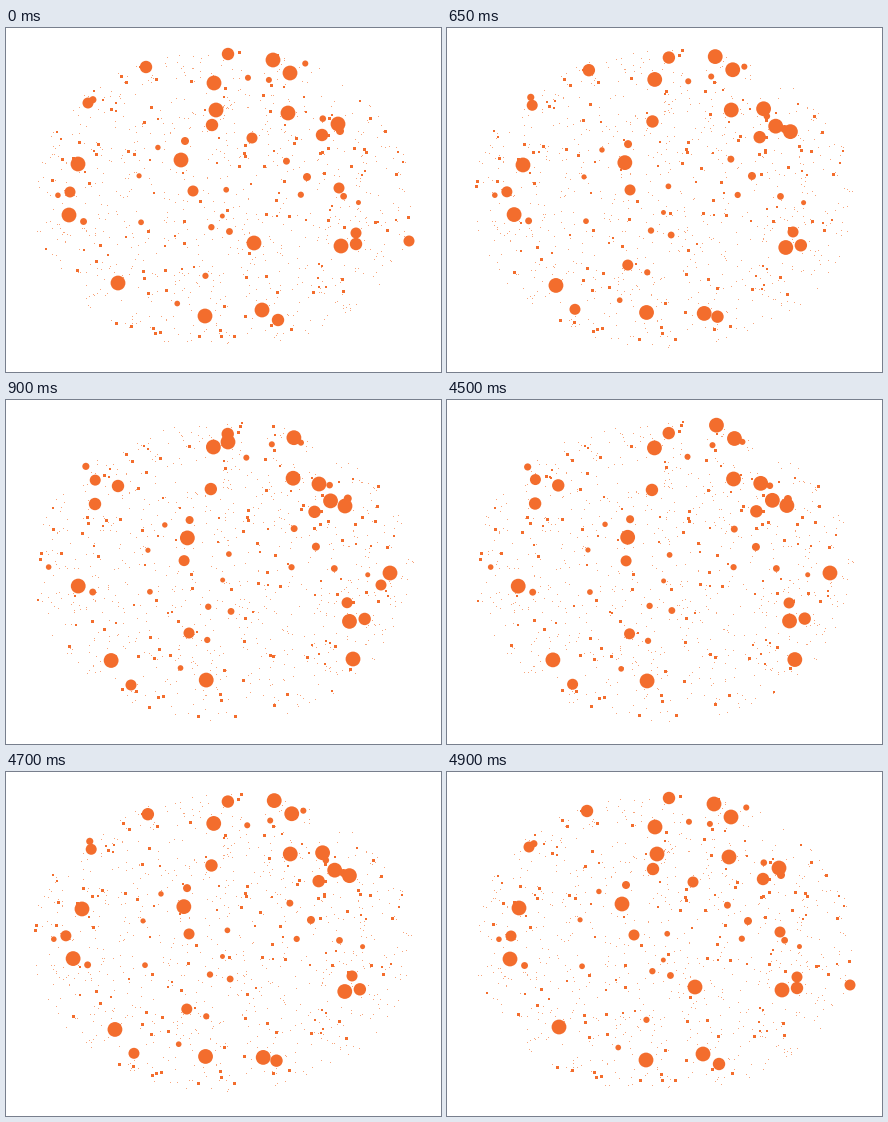
Animation of 435x344 px, one loop 8 s. Source, as a matplotlib script:

```python
import numpy as np
import matplotlib.pyplot as plt
from matplotlib.animation import FuncAnimation

W, H, DPI = 435, 344, 64
STEP_MS, FRAMES, STEPS = 50, 160, 9
FORTH, BACK = 9, 89  # last still tick before each move
CENTER = np.array([217.0, 171.0])
RIM = np.array([191.0, 151.0])
ORANGE, PALE = "#f36d2d", "#f8a57c"
BITS, SPECKS, SMALL = 150, 820, 20

# Key dots: x, y, radius; a negative radius drifts towards the centre.
STEADY = np.array([
    (284, 45, 7.4), (208, 55, 7.4), (282, 85, 7.4), (332, 96, -7.4), (175, 132, -7.4),
    (63, 187, -7.4), (335, 218, 7.4), (112, 255, 7.4), (199, 288, -7.4),
    (222, 26, -6.2), (206, 97, 6.2), (316, 107, -6.2), (350, 216, 6.2),
    (187, 163, 5.5), (82, 75, -5.5), (350, 205, -5.5),
    (334, 103, 4), (179, 113, -4), (301, 149, 4),
])
# Placed in the first pose, in order of vanishing
LEAVING = np.array([
    (248, 215, 7.4), (403, 213, 5.5), (210, 82, -7.4), (246, 110, -5.5),
    (333, 160, 5.5), (72, 136, -7.4), (256, 282, 7.4), (140, 39, -6.2),
    (272, 292, -6.2), (64, 164, 5.5), (267, 32, 7.4),
])
# Placed in the second pose, in order of appearing
ARRIVING = np.array([
    (339, 106, -7.4), (125, 285, 5.5), (313, 84, -7.4), (183, 233, -5.5),
    (347, 259, -7.4), (384, 173, 7.4), (112, 86, -6.2), (89, 104, -6.2),
    (222, 42, 7.4), (375, 185, 5.5),
])


def drift(pos, sign):
    """Radial shift of each particle between the two poses."""
    off = pos - CENTER
    unit = off / np.maximum(np.hypot(*off.T), 1)[:, None]
    return unit * (8 + 1.3 * unit[:, :1] ** 2) * np.sign(sign)[:, None]


def scatter_in_rim(n):
    a = rng.uniform(0, 2 * np.pi, n)
    r = np.sqrt(rng.uniform(0, 1.08, n))
    return CENTER + RIM * np.c_[r * np.cos(a), r * np.sin(a)]


def area(px):
    return (px * 72 / DPI) ** 2


rng = np.random.default_rng(7)

small = np.c_[scatter_in_rim(SMALL),
              rng.uniform(2.4, 3.6, SMALL) * rng.choice([-1, 1], SMALL)]
dots = np.vstack([STEADY, small, LEAVING, ARRIVING])
spot, radius = dots[:, :2], np.abs(dots[:, 2])
spot_shift = drift(spot, dots[:, 2])
spot[-len(ARRIVING):] -= spot_shift[-len(ARRIVING):]

# Steps between which each dot is shown
first, last = np.zeros(len(dots)), np.full(len(dots), STEPS, float)
first[-len(ARRIVING):] = np.linspace(1, STEPS, len(ARRIVING))
last[-len(ARRIVING) - len(LEAVING):-len(ARRIVING)] = np.linspace(0, STEPS - 1, len(LEAVING))

grains = scatter_in_rim(BITS + SPECKS)
grain_shift = drift(grains, rng.choice([-1, 1], BITS + SPECKS))
side = np.r_[rng.choice([2, 3, 3], BITS), np.ones(SPECKS)]
is_bit = np.arange(BITS + SPECKS) < BITS

fig = plt.figure(figsize=(W / DPI, H / DPI), dpi=DPI, facecolor="white")
ax = fig.add_axes([0, 0, 1, 1])
ax.set(xlim=(0, W), ylim=(H, 0))
ax.axis("off")


def layer(pos, size, color, **style):
    return ax.scatter(*pos.T, s=area(size), c=color, linewidths=0, **style)


speck_art = layer(grains[~is_bit], side[~is_bit], PALE, marker="s", antialiased=False)
bit_art = layer(grains[is_bit], side[is_bit], ORANGE, marker="s", antialiased=False)
dot_art = layer(spot, 2 * radius, ORANGE)


def show(art, pos, size, shown):
    art.set_offsets(pos[shown])
    art.set_sizes(area(size[shown]))


def update(i):
    k = np.clip(i - FORTH, 0, STEPS) - np.clip(i - BACK, 0, STEPS)
    t = k / STEPS
    pos = grains + grain_shift * t
    inside = np.hypot(*((pos - CENTER) / RIM).T) <= 1
    pixel = np.floor(pos) + (side % 2)[:, None] / 2
    show(speck_art, pixel, side, inside & ~is_bit)
    show(bit_art, pixel, side, inside & is_bit)
    show(dot_art, spot + spot_shift * t, 2 * radius, (first <= k) & (k <= last))
    return speck_art, bit_art, dot_art


anim = FuncAnimation(fig, update, frames=FRAMES, interval=STEP_MS,
                     repeat=True, repeat_delay=0, blit=False)
plt.show()
```
